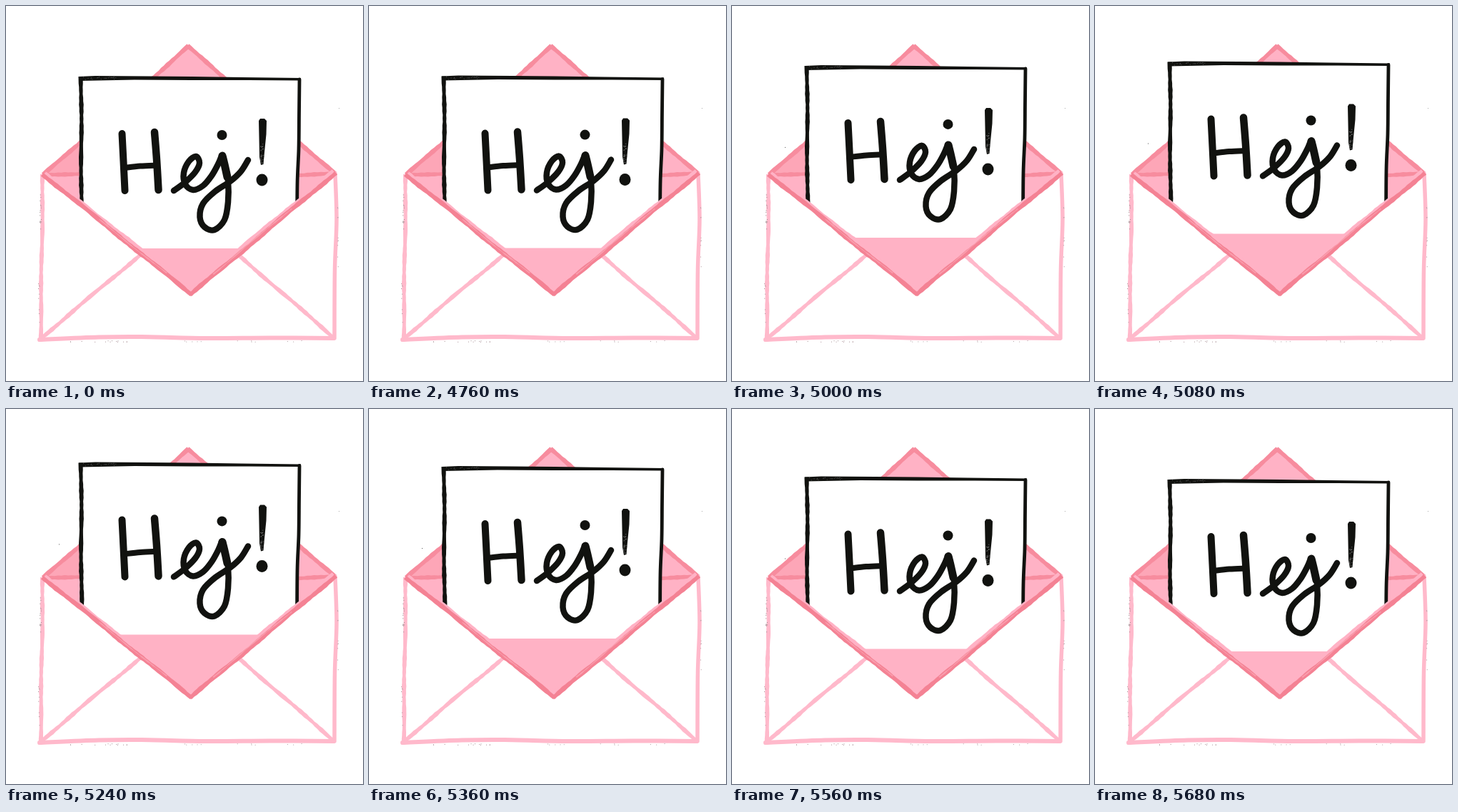
Write an HTML page with a canvas that moves like this. It is 500 px wide and 526 px high and loops after 10000 ms.

```html
<!DOCTYPE html>
<html lang="sv">
<head>
<meta charset="utf-8">
<title>Hej!</title>
<style>
html, body { margin: 0; width: 100%; height: 100%; overflow: hidden; background: #fff; }
canvas { display: block; }
</style>
</head>
<body>
<canvas id="stage" width="500" height="526" aria-label="Hej!"></canvas>
<script>
const ctx = document.getElementById('stage').getContext('2d');
const LOOP = 10000, STEP = 40, START = 4720, LENGTH = 960, LIFT = 24;
const INK = '#11120f', ROSE = '#f78c9e', DEEP = '#f48294', PINK = '#ffb2c5', PALE = '#ffb9cb';

function seeded(seed) {
  return () => (seed = (seed * 16807) % 2147483647) / 2147483647;
}

// Smooth curve through a list of points
function curve(pts, width, color) {
  ctx.beginPath();
  ctx.moveTo(...pts[0]);
  for (let i = 0; i < pts.length - 1; i++) {
    const a = pts[i - 1] || pts[i], b = pts[i], c = pts[i + 1], d = pts[i + 2] || c;
    ctx.bezierCurveTo(
      b[0] + (c[0] - a[0]) / 6, b[1] + (c[1] - a[1]) / 6,
      c[0] - (d[0] - b[0]) / 6, c[1] - (d[1] - b[1]) / 6, c[0], c[1]);
  }
  ctx.lineWidth = width;
  ctx.strokeStyle = color;
  ctx.stroke();
}

// Straight brush stroke with slightly uneven edges
function brush(x1, y1, x2, y2, width, color, seed = 1) {
  const len = Math.hypot(x2 - x1, y2 - y1);
  const nx = (y1 - y2) / len, ny = (x2 - x1) / len;
  const n = Math.ceil(len / 5), edge = [[], []];
  for (let i = 0; i <= n; i++) {
    const u = i / n, s = u * len;
    const x = x1 + (x2 - x1) * u, y = y1 + (y2 - y1) * u;
    const drift = 0.5 * Math.sin(s * 0.045 + seed * 2);
    const half = width / 2 + 0.3 * Math.sin(s * 0.17 + seed) + 0.2 * Math.sin(s * 0.61 + seed * 3);
    edge[0].push([x + nx * (drift + half), y + ny * (drift + half)]);
    edge[1].unshift([x + nx * (drift - half), y + ny * (drift - half)]);
  }
  shape([...edge[0], ...edge[1]], color);
}

function shape(pts, color) {
  ctx.beginPath();
  pts.forEach(p => ctx.lineTo(...p));
  ctx.closePath();
  ctx.fillStyle = color;
  ctx.fill();
}

function oval(x, y, rx, ry, color) {
  ctx.beginPath();
  ctx.ellipse(x, y, rx, ry, 0, 0, 7);
  ctx.fillStyle = color;
  ctx.fill();
}

function specks(count, seed, x, y, w, h, color) {
  const rnd = seeded(seed);
  ctx.fillStyle = color;
  for (let i = 0; i < count; i++) ctx.fillRect(x + rnd() * w, y + rnd() * h, 1, 1);
}

function flap() {
  shape([[51, 237], [255, 57], [461, 235], [259, 402]], PINK);
  shape([[56, 236], [104, 193], [104, 234]], '#fda6b7');
  brush(256, 56, 52, 237, 6, ROSE, 1);
  brush(254, 56, 461, 235, 6, ROSE, 2);
  brush(54, 237, 106, 235, 5.5, ROSE, 3);
  brush(408, 237, 460, 235, 5.5, ROSE, 4);
}

function letter() {
  shape([[105, 101], [411, 102], [409, 340], [106, 340]], '#fff');
  brush(105, 99, 106, 330, 5.6, INK, 1);
  curve([[411, 103], [410.5, 150], [410, 200], [408, 250], [407.5, 330]], 4.8, INK);
  shape([[102, 99], [125, 98], [200, 98.5], [260, 99], [330, 100], [413, 101],
    [413, 104.5], [340, 104], [260, 104], [180, 103.5], [103, 105]], INK);
  specks(22, 31, 108, 99, 48, 4, '#555');

  curve([[162.5, 179], [164.5, 218], [166.5, 259]], 10, INK);
  curve([[208, 177], [211, 215], [213.5, 258]], 10.5, INK);
  curve([[166, 227], [188, 224.5], [211, 223.5]], 8, INK);

  curve([[235, 259], [250, 248], [265, 233], [271, 220], [266, 211], [256, 218],
    [249, 234], [251, 250], [262, 258], [276, 252], [288, 238], [297, 222], [302, 210]], 8.5, INK);
  curve([[303, 210], [306, 222], [310, 240]], 11, INK);
  curve([[304, 211], [307, 225], [311, 245], [311, 275], [306, 300], [292, 314], [278, 310],
    [271.5, 296], [276, 277], [293, 260], [314, 246], [329, 232], [339, 216]], 8.5, INK);
  oval(302.5, 181, 7, 7, INK);

  shape([[354, 161], [356, 158], [362, 158], [365, 161], [364.5, 180], [362, 205],
    [360.5, 222], [357, 223], [355, 212], [354.5, 185]], INK);
  specks(28, 77, 356, 193, 5, 27, '#777');
  oval(358.5, 244, 8, 8.5, INK);
}

function front() {
  shape([[51, 237], [259, 403], [461, 235], [461, 468], [48, 469]], '#fff');
  brush(188, 349, 49, 466, 5.5, PALE, 5);
  brush(323, 347, 460, 466, 5.5, PALE, 6);
  brush(51.5, 236, 48.5, 468, 5.5, PALE, 7);
  curve([[461, 235], [463, 300], [460.5, 370], [460, 466]], 5.5, PALE);
  curve([[47, 468], [130, 464.5], [190, 464], [280, 466], [370, 465.5], [459, 466]], 6, PALE);

  brush(54, 235, 259, 398, 6, PINK, 8);
  brush(259, 398, 459, 232, 6, PINK, 9);
  brush(51, 236, 260, 405, 6.2, DEEP, 10);
  brush(258, 405, 462, 234, 6.2, DEEP, 11);
  brush(130, 299, 225, 375, 1.4, '#fa9dad', 12);
  brush(290, 376, 400, 284, 1.4, '#fa9dad', 13);

  specks(16, 5, 47, 262, 2, 62, '#998488');
  specks(9, 9, 45, 385, 2, 60, '#aa9297');
  specks(14, 13, 90, 469, 80, 2, '#aa9297');
  specks(12, 17, 250, 469, 180, 2, '#b39ca1');
  specks(10, 23, 464, 280, 1, 90, '#b39ca1');
}

function draw(now) {
  const t = Math.floor((now % LOOP) / STEP) * STEP;
  const u = Math.min(1, Math.max(0, (t - START) / LENGTH));
  const rise = LIFT * Math.sin(Math.PI * u) ** 2;

  ctx.fillStyle = '#fff';
  ctx.fillRect(0, 0, 500, 526);
  ctx.lineCap = ctx.lineJoin = 'round';
  specks(1, 3, 466, 143, 0, 0, '#aaa');
  if (rise > 1) specks(1, 3, 74, 213 - rise, 0, 0, '#555');
  flap();
  ctx.save();
  ctx.translate(0, -rise);
  letter();
  ctx.restore();
  front();
}

function tick() {
  draw(performance.now());
  requestAnimationFrame(tick);
}
tick();
</script>
</body>
</html>
```
